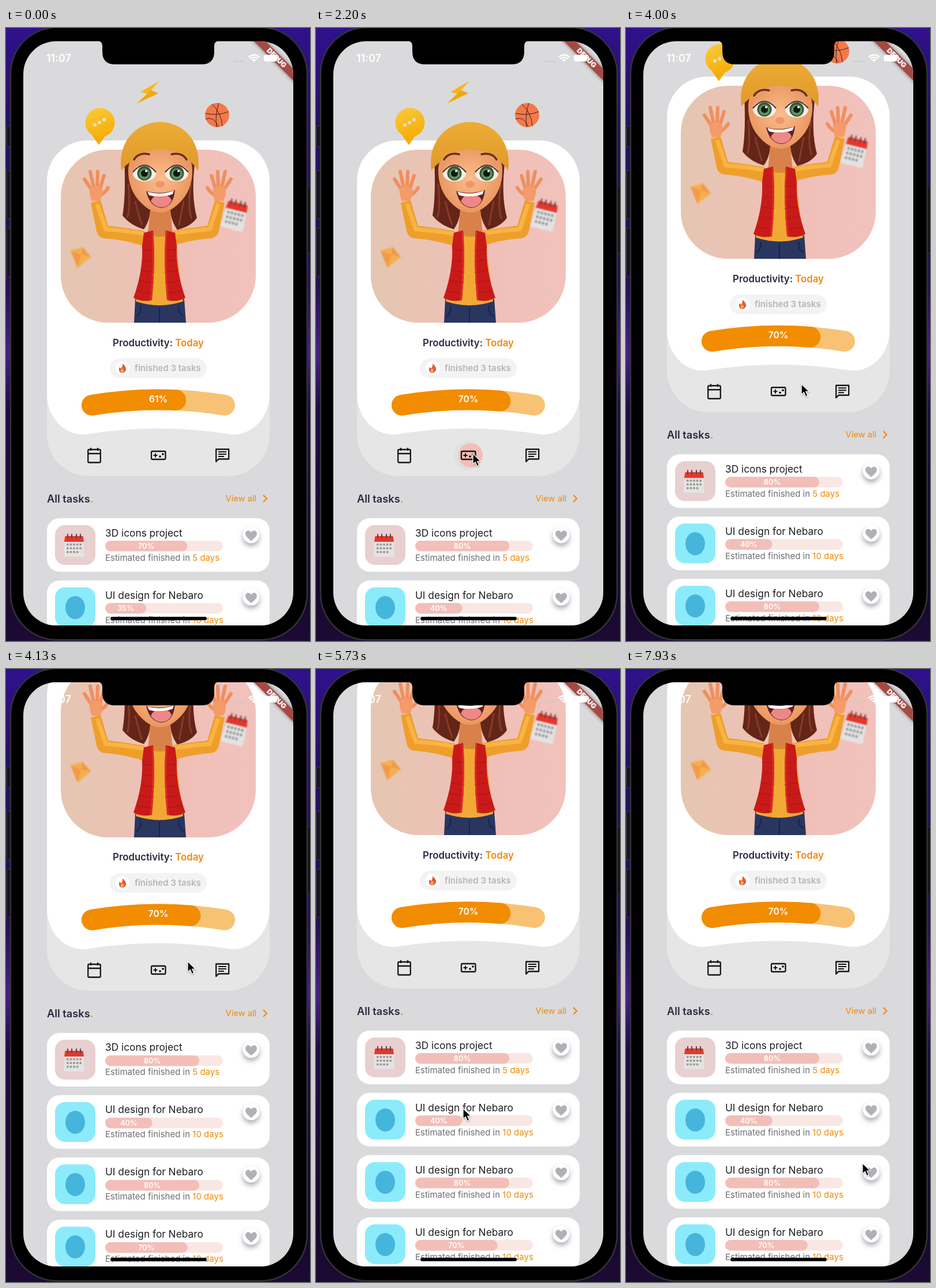
An HTML page for the animation above (8 s loop, 527 by 1063 pixels).

```html
<!DOCTYPE html>
<html lang="en">
<head>
<meta charset="utf-8">
<title>Productivity app</title>
<style>
html, body { margin: 0; width: 100%; height: 100%; overflow: hidden; background: #000; }
svg { display: block; width: 100%; height: 100%; font-family: Inter, sans-serif; }
.mid { text-anchor: middle; }
.white { fill: #fff; }
.accent { fill: #ee8a0c; }
.line { fill: none; stroke: #161616; stroke-width: 2.3; stroke-linejoin: round; }
.lift { filter: drop-shadow(0 5px 4px rgba(60, 50, 70, .42)); }
</style>
</head>
<body>
<svg id="stage" viewBox="0 0 527 1063" preserveAspectRatio="none"></svg>
<script>
const LOOP = 8000;
const SCROLL_END = 223;
const tasks = [
  { title: '3D icons project', percent: 80, days: 5 },
  { title: 'UI design for Nebaro', percent: 40, days: 10 },
  { title: 'UI design for Nebaro', percent: 80, days: 10 },
  { title: 'UI design for Nebaro', percent: 70, days: 10 }
];
const cardTop = i => 850 + 108 * i;

// Pointer path: time, x, y
const pointerPath = [
  [560, 388, 182], [950, 157, 737], [1350, 157, 737], [1750, 272, 738],
  [2350, 272, 738], [2640, 382, 737], [3300, 382, 737], [3680, 293, 731],
  [3870, 293, 730], [4130, 315, 507], [4230, 316, 500], [4750, 300, 560],
  [5450, 253, 736], [5730, 255, 762], [6250, 255, 765], [6600, 272, 867],
  [7180, 272, 867], [7500, 398, 858], [7800, 406, 858], [7930, 410, 857]
];
const scrollPath = [[3870, 0], [4130, 219], [4230, SCROLL_END]];
const iconTaps = [
  { x: 153, down: 1020, up: 1260 },
  { x: 264, down: 2000, up: 2240 },
  { x: 375, down: 2880, up: 3120 }
];
const cardTaps = [
  { card: 1, x: 258, down: 5880, up: 6120 },
  { card: 2, x: 272, down: 6670, up: 7130 }
];

const clamp = v => Math.max(0, Math.min(1, v));
const ease = v => v * v * (3 - 2 * v);

function along(path, t) {
  const next = path.findIndex(p => p[0] > t);
  if (next === 0) return path[0].slice(1);
  if (next < 0) return path[path.length - 1].slice(1);
  const a = path[next - 1], b = path[next];
  const k = ease((t - a[0]) / (b[0] - a[0]));
  return a.slice(1).map((v, i) => v + (b[i + 1] - v) * k);
}

function calendar() {
  let cells = '';
  for (let i = 0; i < 14; i++)
    cells += `<rect x="${-13 + i % 5 * 5.6}" y="${-4 + Math.floor(i / 5) * 6.5}" width="3.6" height="3.6" rx="1" fill="#969698"/>`;
  return `<path d="M-16-13H16L18 17Q18 19 15 19H-15Q-18 19-18 17Z" fill="#e4e3e2"/>
    <path d="M-14-17H14Q16-17 16-14L17-7H-17L-16-14Q-16-17-14-17Z" fill="#e5372c"/>${cells}
    <path d="M-11-20v6M-4-20v6M4-20v6M11-20v6" stroke="#51444a" stroke-width="2" stroke-linecap="round"/>`;
}

const arm = `
  <path d="M240 352Q205 346 177 343L164 299L147 303L157 352Q160 365 174 365Q212 368 243 380Z" fill="#ee9f2b"/>
  <path d="M240 357Q204 351 173 349L158 305" fill="none" stroke="#f9b443" stroke-width="7" stroke-linejoin="round"/>
  <g fill="none" stroke="#f08f5e" stroke-width="6" stroke-linecap="round">
    <path d="M148 280L136 262M152 276L146 249M158 275L159 249M163 278L170 256M163 290Q171 287 177 277"/>
  </g>
  <path d="M145 278Q156 270 167 278Q169 289 163 300H149Q144 290 145 278Z" fill="#f39b69"/>`;

const vest = `
  <path d="M239 355L255 351Q259 405 253 472Q236 476 221 468Q238 420 236 378Z" fill="#c91a1a"/>
  <path d="M238 384l19 2M238 402l19 3M235 420l22 4M231 438l25 4M226 456l28 4" stroke="#b01518" stroke-width="1.5"/>
  <path d="M254 354Q258 410 251 472" fill="none" stroke="#df2a26" stroke-width="3"/>`;

const eye = x => `
  <ellipse cx="${x}" cy="252" rx="20" ry="14" fill="#f6efe9"/>
  <circle cx="${x}" cy="252" r="12.5" fill="#35563a"/><circle cx="${x}" cy="253" r="9.5" fill="#5f9357"/>
  <circle cx="${x}" cy="252" r="6" fill="#101612"/><circle cx="${x + 3}" cy="248" r="2" fill="#fff"/>
  <path d="M${x - 20} 250Q${x} 226 ${x + 20} 250" fill="none" stroke="#4a251b" stroke-width="2"/>`;

const girl = `
  <path d="M205 228Q208 290 202 325Q215 342 239 349Q252 330 250 305H284Q284 332 297 350Q321 344 331 329Q320 290 328 228Z" fill="#642519"/>
  <path d="M212 270Q216 315 210 329M321 270Q314 310 322 331M224 300Q230 326 236 342M308 300Q303 326 300 342" fill="none" stroke="#873b27" stroke-width="3"/>
  <path d="M251 305H284L289 358Q268 370 246 358Z" fill="#d9814a"/>
  ${arm}<g transform="translate(526) scale(-1 1)">${arm}</g>
  <path d="M224 470H309L312 511H222Z" fill="#293660"/>
  <path d="M266 484V511M233 482Q236 494 226 500M300 482Q297 494 308 500" fill="none" stroke="#18234a" stroke-width="2"/>
  <path d="M238 354Q268 370 295 354L298 400L307 474Q266 488 225 474L238 400Z" fill="#f1a936"/>
  <path d="M246 353Q268 366 288 353" fill="none" stroke="#d78a27" stroke-width="4"/>
  ${vest}<g transform="translate(532) scale(-1 1)">${vest}</g>
  <path d="M212 245Q214 204 267 202Q321 204 323 245Q324 281 300 304Q267 336 235 304Q211 281 212 245Z" fill="url(#skin)"/>
  <path d="M200 247C193 196 227 163 267 163C307 163 340 196 333 247Q328 240 322 234Q306 211 267 211Q229 211 213 234Q205 240 200 247Z" fill="url(#hat)"/>
  <g fill="none" stroke="#64301f" stroke-width="3.4" stroke-linecap="round">
    <path d="M222 228Q230 215 248 219M287 219Q305 215 313 228"/></g>
  ${eye(240)}${eye(296)}
  <ellipse cx="267" cy="271" rx="8" ry="6" fill="#ee976a"/>
  <path d="M243 283Q268 290 293 281Q290 311 269 312Q249 310 243 283Z" fill="#661d20"/>
  <path d="M245 284Q268 291 291 282L289 288Q268 296 248 290Z" fill="#fff"/>
  <path d="M251 300Q256 288 269 293Q283 287 287 299Q282 311 269 311Q257 310 251 300Z" fill="#ed8886"/>`;

const floating = `
  <path d="M267 91L233 111L245 114L227 131L264 113L251 108Z" fill="#fdb515"/>
  <path d="M251 108L264 113L227 131L245 114Z" fill="#eda90f"/>
  <path d="M148 184L161 203L174 184Z" fill="#f3ad0d"/>
  <circle cx="163" cy="164" r="25.5" fill="url(#bubble)"/>
  <g fill="#e5dfd0"><circle cx="154" cy="168" r="3"/><circle cx="162" cy="164" r="3"/><circle cx="170" cy="159" r="3"/></g>
  <circle cx="366" cy="151" r="21" fill="#f4794a"/>
  <path d="M346 148Q367 153 386 145M357 132Q374 148 375 170M369 130Q362 151 365 172M346 158Q360 152 368 171" fill="none" stroke="#3a211b"/>`;

const icons = `
  <g class="line">
    <rect x="142.2" y="731" width="21.6" height="22.5" rx="2"/><path d="M142 738H164M147 728V733M159 728V733"/>
    <rect x="252" y="734" width="24.5" height="14" rx="2"/><path d="M255.5 741H262.5M259 737.5V744.5" stroke-width="2"/>
    <path d="M364.2 752V730.5H386.2V747.5H368.5Z"/><path d="M368 735H382M368 739H382M368 743H378" stroke-width="2"/>
  </g><circle cx="267" cy="743" r="1.8"/><circle cx="272" cy="739" r="1.8"/>`;

function taskCard(task, i) {
  const y = cardTop(i);
  const picture = i
    ? '<ellipse cx="120" cy="47" rx="17" ry="20" fill="#45b5dc"/>'
    : `<g transform="translate(118 48)">${calendar()}</g>`;
  return `<g transform="translate(0 ${y})">
    <rect x="71" width="386" height="93" rx="22" fill="#fff"/>
    <rect x="85" y="12" width="70" height="69" rx="17" fill="${i ? '#8cebfb' : '#e8cfd0'}"/>${picture}
    <text x="172" y="31.5" font-size="17.3" fill="#1d1d20">${task.title}</text>
    <rect x="172" y="39" width="204" height="18.5" rx="9.2" fill="#f9e7e4"/>
    <rect id="bar${i}" x="172" y="39" height="18.5" rx="9.2" fill="#f2bfb8"/>
    <text id="label${i}" class="mid white" y="53" font-size="12.8" font-weight="600"></text>
    <text x="172" y="73.5" font-size="15" fill="#6e6e73">Estimated finished in <tspan class="accent">${task.days} days</tspan></text>
    <g clip-path="url(#card)" fill="#b1581b">
      <rect id="tint${i}" x="71" width="386" height="93" opacity="0"/><circle id="ripple${i}" cy="36" opacity="0"/>
    </g>
    <circle class="lift white" cx="425" cy="29" r="14.5"/>
    <path transform="translate(425 30.5)" d="M0 9C-4 5-10 1-10-3.5C-10-10-2-11 0-5.5C2-11 10-10 10-3.5C10 1 4 5 0 9Z" fill="#b3afb7"/>
  </g>`;
}

const stage = document.getElementById('stage');
stage.innerHTML = `
<defs>
  <linearGradient id="wall" x2="0" y2="1">
    <stop stop-color="#30118c"/><stop offset=".15" stop-color="#231061"/><stop offset=".42" stop-color="#241052"/>
    <stop offset=".53" stop-color="#472185"/><stop offset=".62" stop-color="#1c0b45"/>
    <stop offset=".9" stop-color="#150829"/><stop offset="1" stop-color="#1d0a35"/>
  </linearGradient>
  <linearGradient id="photo"><stop stop-color="#e5c6b2"/><stop offset=".65" stop-color="#f0c0b8"/><stop offset="1" stop-color="#f1c2bc"/></linearGradient>
  <linearGradient id="bubble" x2=".4" y2="1"><stop stop-color="#f8cc3c"/><stop offset="1" stop-color="#f8b00b"/></linearGradient>
  <radialGradient id="skin"><stop stop-color="#fabd8e"/><stop offset="1" stop-color="#ea9760"/></radialGradient>
  <linearGradient id="hat" x2="0" y2="1"><stop stop-color="#eeac35"/><stop offset="1" stop-color="#df992b"/></linearGradient>
  <clipPath id="screen"><rect x="30" y="23" width="468" height="1013" rx="57"/></clipPath>
  <clipPath id="card"><rect x="71" width="386" height="93" rx="22"/></clipPath>
</defs>
<rect width="527" height="1063" fill="url(#wall)"/>
<g fill="#16151b" stroke="#3b3a42">
  <rect x="1" y="170" width="9" height="36" rx="2"/><rect x="1" y="247" width="9" height="84" rx="2"/>
  <rect x="1" y="347" width="9" height="84" rx="2"/><rect x="519" y="274" width="9" height="116" rx="2"/>
</g>
<rect x="8" y="-1" width="514" height="1062" rx="80" stroke="#333338" stroke-width="2.5"/>
<g clip-path="url(#screen)">
  <rect x="30" y="23" width="468" height="1013" fill="#dadadc"/>
  <g id="content">
    <path d="M71 600H457V705A72 72 0 0 1 385 777H143A72 72 0 0 1 71 705Z" fill="#e6e6e6"/>
    <path d="M71 265A70 70 0 0 1 141 195H387A70 70 0 0 1 457 265V635C457 675 425 711 385 704Q264 685 143 704C103 711 71 675 71 635Z" fill="#fff"/>
    <rect x="95" y="211" width="338" height="300" rx="82" fill="url(#photo)"/>
    <g style="filter:blur(1.2px)">
      <g transform="translate(397 325) rotate(14) scale(1.1 1.3)">${calendar()}</g>
      <path d="M112 386L133 380L147 397L124 416Z" fill="#f4b04d"/><path d="M112 386L130 393L124 416ZM130 393L133 380L147 397Z" fill="#f39a48"/>
    </g>
    ${girl}${floating}
    <text class="mid" x="264" y="551.5" font-size="16.8" font-weight="600" fill="#2c2840">Productivity: <tspan class="accent">Today</tspan></text>
    <rect x="180" y="573" width="168" height="34" rx="17" fill="#f3f3f4"/><circle class="white" cx="202" cy="590" r="12"/>
    <path d="M202 582Q209 588 208 593Q206 598 201 598Q195 597 196 590L198 588L199 591Q203 587 202 582Z" fill="#ea5338"/>
    <path d="M202 590Q206 595 202 597Q197 597 199 593Z" fill="#fbb04a"/>
    <text x="223" y="595" font-size="15" font-weight="600" fill="#b5b5bb">finished 3 tasks</text>
    <g fill="none" stroke-width="36" stroke-linecap="round">
      <path d="M149 654Q264 635 379 654" stroke="#f8c274"/>
      <path id="arc" pathLength="100" d="M149 654Q264 635 379 654" stroke="#f28c00"/>
    </g>
    <text id="total" class="mid white" x="264" y="649" font-size="15.5" font-weight="600"></text>
    <g id="iconInk"><circle id="halo" cy="741" r="25" fill="#000"/><circle id="iconRipple" cy="741" fill="#f2beb7"/></g>
    ${icons}
    <text x="71" y="823" font-size="18.2" font-weight="600" fill="#2c2840">All tasks<tspan class="accent">.</tspan></text>
    <text class="accent" x="380.5" y="821" font-size="14.7">View all</text>
    <path d="M446 810L452 816L446 822" fill="none" stroke="#ee8a0c" stroke-width="2.2"/>
    ${tasks.map(taskCard).join('')}
  </g>
  <g transform="translate(469 52) rotate(45)">
    <rect x="-70" y="-7.1" width="140" height="14.2" fill="#a64943" style="filter:drop-shadow(0 0 3px rgba(0,0,0,.5))"/>
    <text class="mid white" y="4.4" font-size="12.2" font-weight="900">DEBUG</text>
  </g>
  <g class="white">
    <text x="70" y="59" font-size="18" font-weight="600">11:07</text>
    <rect x="447" y="46.5" width="23" height="11.5" rx="3.5"/><rect x="471" y="50" width="2" height="4.5" rx="1"/>
    <path d="M426.5 55Q430 52 433.5 55L430 59Z"/>
    <path d="M420.5 50.5Q430 42.5 439.5 50.5M423.5 53.5Q430 48 436.5 53.5" fill="none" stroke="#fff" stroke-width="2.3"/>
  </g>
  <path d="M395 58H413" stroke="#c5c5c8" stroke-width="2.5" stroke-dasharray="2.5 2.7"/>
  <path d="M158 22Q167 23 167 31V41Q167 63 189 63H339Q361 63 361 41V31Q361 23 370 22Z"/>
  <rect x="181" y="1021" width="167" height="6" rx="3"/>
</g>
<path id="pointer" d="M0 0V18.5L4.3 14.6L7.4 21.8L10.8 20.3L7.7 13.3H13.5Z" stroke="#fff" stroke-width="1.3" style="filter:drop-shadow(0 1px 1px rgba(0,0,0,.35))"/>`;

const byId = id => document.getElementById(id);
const set = (id, attrs) => {
  for (const name in attrs) byId(id).setAttribute(name, attrs[name]);
};
const label = (id, value) => { byId(id).textContent = Math.round(value) + '%'; };
const inkStrength = (tap, t) => clamp((t - tap.down) / 150) * (1 - clamp((t - tap.up) / 220));

function drawProgress(t) {
  const grown = Math.min(1, .872 + t * .00025);
  const total = 70 * grown;
  set('arc', { 'stroke-dasharray': `${74 - (70 - total) * 1.22} 200` });
  label('total', total);
  tasks.forEach((task, i) => {
    const value = task.percent * grown, width = 2.04 * value;
    set('bar' + i, { width });
    set('label' + i, { x: 172 + width / 2 });
    label('label' + i, value);
  });
}

function drawInk(t) {
  const tap = iconTaps.find(p => t < p.up + 250) || iconTaps[0];
  const strength = inkStrength(tap, t);
  set('halo', { cx: tap.x, opacity: .025 * strength });
  set('iconRipple', { cx: tap.x + 4, r: Math.min(25, Math.max(0, t - tap.down) * .105), opacity: strength });
  for (const press of cardTaps) {
    const alpha = inkStrength(press, t);
    const held = Math.max(0, t - press.down), released = Math.max(0, t - press.up);
    set('tint' + press.card, { opacity: .18 * alpha });
    set('ripple' + press.card, { cx: press.x, r: held * .2025 + released * .5, opacity: .16 * alpha });
  }
}

function draw(now) {
  const t = now % LOOP;
  const [x, y] = along(pointerPath, t);
  set('content', { transform: `translate(0 ${-along(scrollPath, t)[0]})` });
  set('pointer', { transform: `translate(${x} ${y})`, opacity: t < pointerPath[0][0] ? 0 : 1 });
  drawProgress(t);
  drawInk(t);
}

const start = performance.now();
function tick() {
  draw(performance.now() - start);
  requestAnimationFrame(tick);
}
tick();
</script>
</body>
</html>
```
